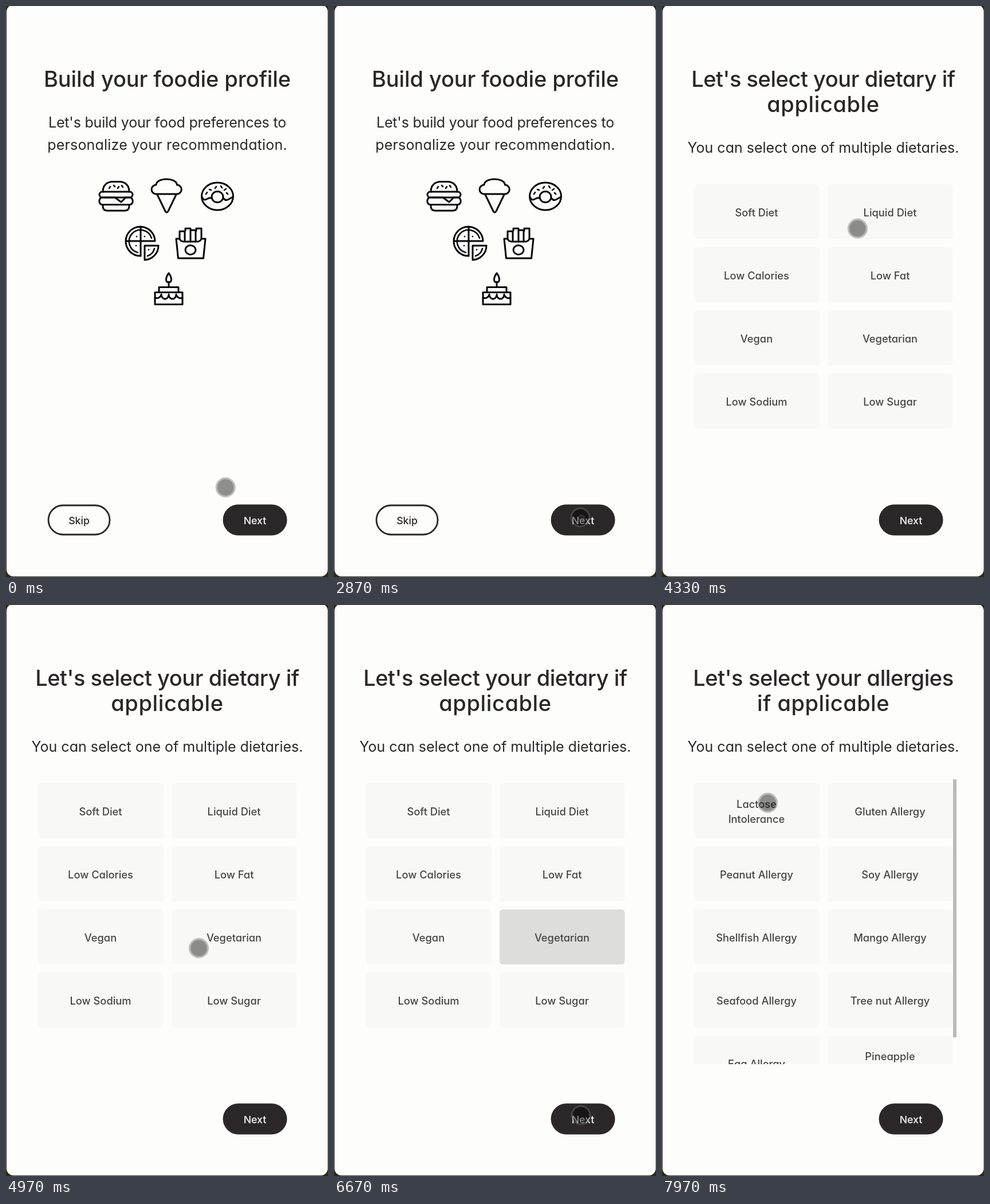
Recreate the animation shown at these times as an HTML page. Size 562x996 px, loop 8000 ms.

```html
<!DOCTYPE html>
<html lang="en">
<head>
<meta charset="utf-8">
<title>Foodie profile</title>
<style>
  html, body { margin: 0; width: 100%; height: 100%; overflow: hidden; background: #2a2914; }
  svg { display: block; width: 100vw; height: 100vh; }
  text { font-family: Inter, "Open Sans", sans-serif; font-feature-settings: "cv11"; text-anchor: middle; }
  .title { font-size: 38px; font-weight: 500; fill: #2b2627; }
  .sub { font-size: 25px; fill: #29282b; }
  .label { font-size: 18.3px; font-weight: 500; fill: #464546; }
  .button { font-size: 17.7px; font-weight: 500; fill: #2b2627; }
  .light { fill: #fbfbfb; }
  .icons { fill: none; stroke: #050508; stroke-width: 3; stroke-linecap: round; stroke-linejoin: round; }
  .thin { stroke-width: 2.6; }
</style>
</head>
<body>
<svg viewBox="0 0 562 996" xmlns="http://www.w3.org/2000/svg">
  <defs>
    <radialGradient id="wave">
      <stop offset="0" stop-color="#fff" stop-opacity=".06"/>
      <stop offset=".5" stop-color="#fff" stop-opacity=".12"/>
      <stop offset=".8" stop-color="#fff" stop-opacity=".32"/>
      <stop offset="1" stop-color="#fff" stop-opacity="0"/>
    </radialGradient>
    <clipPath id="list"><rect x="40" y="300" width="480" height="501"/></clipPath>
    <clipPath id="pill"><rect x="378.500" y="869.500" width="112" height="54" rx="27"/></clipPath>
  </defs>

  <rect x="1" y="-2" width="560.500" height="997" rx="12" fill="#fdfdfc"/>

  <g id="intro">
    <g class="icons">
      <!-- burger -->
      <path d="M169 324C169 312 177 306.500 186 306.500H198C208 306.500 215 313 215 324M169 347v2q0 8 8 8h30q8 0 8-8v-2"/>
      <rect x="163" y="324" width="58" height="10" rx="5"/>
      <path d="M189 334H168a5 6 0 0 0 0 12.500H216a5 6 0 0 0 0-12.500H209L201 342L190 334"/>
      <path class="thin" d="M180 318l2-3M188 313l2 2M195 318l2-3M202 313l2 3"/>
      <!-- ice cream -->
      <path d="M264 328H262A8 8 0 0 1 262 312C263 298.500 297 298.500 298.500 312A8 8 0 0 1 298 328ZM264 329L278 358Q280.500 362 283 358L297 329"/>
      <!-- donut -->
      <ellipse cx="369" cy="332" rx="27.500" ry="24"/>
      <ellipse cx="369" cy="333" rx="10" ry="9.500"/>
      <path d="M342 333q3 7 8 4t9-2M379 335q4 5 8 3t9-5"/>
      <path class="thin" d="M349 328l2-3M355 320l3 1M365 318l2-3M375 314l2 3M381 321l3-2M387 328l-2-2"/>
      <!-- pizza -->
      <path d="M235 436A25.500 25.500 0 1 1 260 410H210M235 385V436M242 418H266A25 25 0 0 1 242 443Z"/>
      <path class="thin" d="M230 430A20 20 0 1 1 254 405M247 436A18 18 0 0 0 259 423M228 402v.1M242 402v.1M227 418v.1M249 425v.1"/>
      <!-- fries -->
      <path d="M297 406H303Q305 411 310 411H334Q339 411 341 406H348L344.500 440H300.500Z"/>
      <ellipse cx="322" cy="425.500" rx="9" ry="8"/>
      <path d="M303 405V393H312V410M313 392V388H322V410M323 391H331V410M332 392V388H341V405"/>
      <!-- cake -->
      <path d="M260 499.500H308V520.500H260ZM267 499V490.500H301V499M284 481V490M284 466C290 474 290 482 284 482S278 474 284 466"/>
      <path d="M260 509A8 7 0 0 0 271 503A6.500 8 0 0 0 284 503A6.500 8 0 0 0 297 503A8 7 0 0 0 308 509"/>
    </g>
    <rect x="74" y="871" width="107" height="51" rx="25.500" fill="#fdfdfc" stroke="#2b2627" stroke-width="2.800"/>
    <text class="button" x="127.500" y="904">Skip</text>
  </g>
  <g id="diet"></g>
  <g id="allergy">
    <g id="allergyList" clip-path="url(#list)"></g>
    <rect x="508" y="304" width="6" height="450" fill="#bababa"/>
  </g>

  <rect x="378.500" y="869.500" width="112" height="54" rx="27" fill="#2c2728"/>
  <g clip-path="url(#pill)"><g transform="translate(432 893)"><circle id="ripple" r="60" fill="url(#wave)"/></g></g>
  <text class="button light" x="434.500" y="904">Next</text>

  <g id="pointer">
    <circle r="14.500" fill="#000" fill-opacity=".44"/>
    <circle r="16" fill="none" stroke="#6c6c6a" stroke-opacity=".44" stroke-width="3"/>
  </g>
</svg>
<script>
const LOOP = 8000;
const TO_DIET = 2950, PICK = 5200, TO_ALLERGY = 7150;
const $ = id => document.getElementById(id);

const add = (id, markup) => $(id).insertAdjacentHTML('beforeend', markup);
const line = (cls, y, text, spacing = 0, x = 281.5) =>
  `<text class="${cls}" x="${x}" y="${y}" letter-spacing="${spacing}">${text}</text>`;

function cards(names) {
  return names.map((name, i) => {
    const x = i % 2 ? 289 : 56, y = 311 + (i >> 1) * 110;
    const lines = name.split('|');
    const first = y + 55.5 - (lines.length - 1) * 13;
    const box = attrs => `<rect x="${x}" y="${y}" width="218.5" height="96" rx="6" ${attrs}/>`;
    return box('fill="#f8f8f7"') +
      (name === 'Vegetarian' ? box('id="picked" fill="#dddddb"') : '') +
      lines.map((s, k) => line('label', first + k * 26.5, s, 0, x + 109)).join('');
  }).join('');
}

add('intro',
  line('title', 141, 'Build your foodie profile', -.1) +
  line('sub', 212, "Let's build your food preferences to", -.2) +
  line('sub', 251, 'personalize your recommendation.', .2));

add('diet',
  line('title', 141, "Let's select your dietary if", -.45) +
  line('title', 185, 'applicable', .6) +
  line('sub', 256, 'You can select one of multiple dietaries.') +
  cards(['Soft Diet', 'Liquid Diet', 'Low Calories', 'Low Fat',
         'Vegan', 'Vegetarian', 'Low Sodium', 'Low Sugar']));

add('allergy',
  line('title', 141, "Let's select your allergies", -.4) +
  line('title', 185, 'if applicable', .5) +
  line('sub', 256, 'You can select one of multiple dietaries.'));

add('allergyList', cards(['Lactose|Intolerance', 'Gluten Allergy', 'Peanut Allergy', 'Soy Allergy',
  'Shellfish Allergy', 'Mango Allergy', 'Seafood Allergy', 'Tree nut Allergy',
  'Egg Allergy', 'Pineapple|Allergy']));

// steps: [ms, keyframe, easing towards the next step]
function play(id, steps) {
  const frames = steps.map(([ms, style, easing = 'linear']) => ({ offset: ms / LOOP, easing, ...style }));
  $(id).animate(frames, { duration: LOOP, iterations: Infinity });
}

const show = (from, to) => [
  [0, { opacity: from ? 0 : 1 }, 'step-end'],
  ...(from ? [[from, { opacity: 1 }, 'step-end']] : []),
  ...(to < LOOP ? [[to, { opacity: 0 }, 'step-end']] : []),
  [LOOP, { opacity: to < LOOP ? 0 : 1 }]
];
play('intro', show(0, TO_DIET));
play('diet', show(TO_DIET, TO_ALLERGY));
play('allergy', show(TO_ALLERGY, LOOP));

play('picked', [
  [0, { opacity: 0 }], [PICK, { opacity: 0 }], [PICK + 120, { opacity: 1 }], [LOOP, { opacity: 1 }]
]);

const wave = (scale, opacity) => ({ transform: `scale(${scale})`, opacity });
const burst = ms => [
  [ms - 80, wave(0, 0), 'step-end'],
  [ms - 79, wave(.1, 1), 'ease-out'],
  [ms + 220, wave(1, .9)],
  [ms + 430, wave(1.35, 0), 'step-end']
];
play('ripple', [[0, wave(0, 0), 'step-end'], ...burst(TO_DIET), ...burst(TO_ALLERGY), [LOOP, wave(0, 0)]]);

const at = (x, y) => ({ transform: `translate(${x}px, ${y}px)` });
play('pointer', [
  [0, at(383, 839.5), 'ease-out'],
  [650, at(430, 892)],
  [3120, at(430, 892), 'ease-in-out'],
  [3620, at(341.5, 382)],
  [4250, at(341.5, 382), 'ease-in-out'],
  [4930, at(336.5, 598.5)],
  [5380, at(336.5, 598.5), 'ease-in'],
  [5770, at(415, 801.5), 'ease-out'],
  [6050, at(431, 890)],
  [7270, at(431, 890), 'ease-in'],
  [7370, at(432, 883), 'ease-in-out'],
  [7940, at(184.5, 345)],
  [LOOP, at(184.5, 345)]
]);
</script>
</body>
</html>
```
